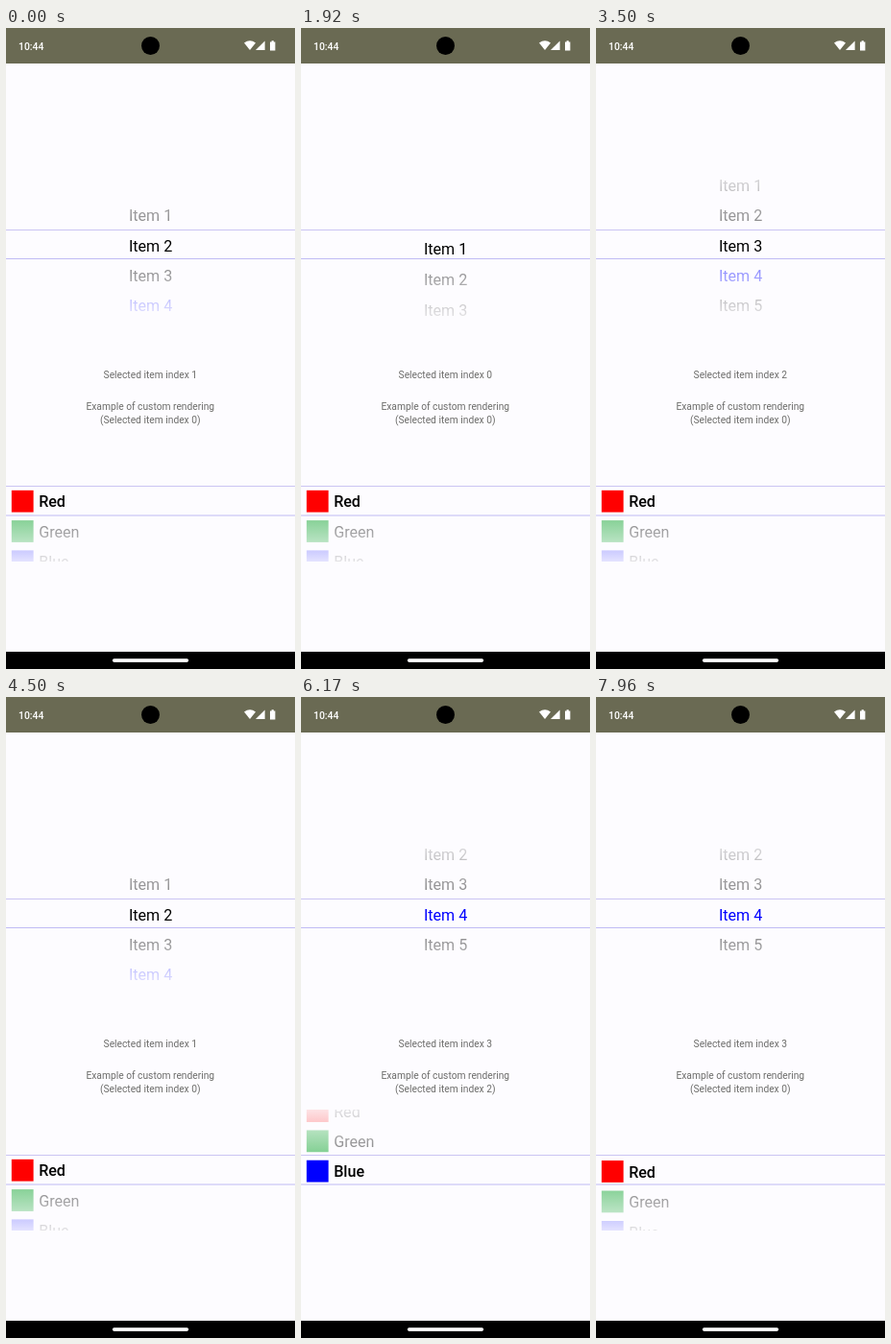
An HTML page for the animation above (8000 ms loop, 301x668 px).

```html
<!DOCTYPE html>
<html lang="en">
<head>
<meta charset="utf-8">
<title>Wheel pickers</title>
<style>
  html, body { margin: 0; width: 100%; height: 100%; overflow: hidden; background: #fdfcff; }
  svg { display: block; width: 301px; height: 668px; font-family: Roboto, sans-serif; }
  .item { font-size: 16.1px; }
  .note { font-size: 10.25px; fill: #6c6c6a; text-anchor: middle; }
  .clock { font-size: 10.4px; font-weight: 500; fill: #fff; }
</style>
</head>
<body>
<svg id="stage" viewBox="0 0 301 668">
  <defs>
    <clipPath id="clipItems"><rect y="150" width="301" height="152"/></clipPath>
    <clipPath id="clipColors"><rect y="430" width="301" height="126"/></clipPath>
    <linearGradient id="fadeUp" x1="0" y1="1" x2="0" y2="0">
      <stop offset="0" stop-color="#fdfcff" stop-opacity=".5"/>
      <stop offset="1" stop-color="#fdfcff" stop-opacity=".9"/>
    </linearGradient>
    <linearGradient id="fadeDown" x1="0" y1="0" x2="0" y2="1">
      <stop offset="0" stop-color="#fdfcff" stop-opacity=".5"/>
      <stop offset="1" stop-color="#fdfcff" stop-opacity=".9"/>
    </linearGradient>
  </defs>
  <rect width="301" height="668" fill="#fdfcff"/>

  <g id="items" class="item" text-anchor="middle" clip-path="url(#clipItems)"></g>
  <g id="colors" class="item" clip-path="url(#clipColors)"></g>
  <g id="bands"></g>

  <text class="note" x="150.3" y="365" id="itemNote"></text>
  <text class="note" x="150.3" y="397.6">Example of custom rendering</text>
  <text class="note" x="150.3" y="411.8" id="colorNote"></text>

  <rect width="301" height="37" fill="#6a6a53"/>
  <circle cx="150.5" cy="18.5" r="9.5"/>
  <text class="clock" x="13" y="22.6">10:44</text>
  <g fill="#fff">
    <path d="M248 15.6Q254 10.8 260 15.6L254 23Z"/>
    <path d="M269.6 13.4V23H260Z"/>
    <path d="M275 14.4h1.6v-1.2h2.2v1.2h1.6v9.2h-5.4Z"/>
  </g>
  <rect y="650" width="301" height="18"/>
  <rect x="110.8" y="657.2" width="79.4" height="3.7" rx="1.8" fill="#fff"/>
</svg>
<script>
const LOOP = 8000, PITCH = 31.3;
const $ = id => document.getElementById(id);

function add(parent, tag, attrs, text = '') {
  const el = document.createElementNS('http://www.w3.org/2000/svg', tag);
  for (const key in attrs) el.setAttribute(key, attrs[key]);
  el.textContent = text;
  parent.append(el);
  return el;
}

// Fades above and below the selected row, and its two rules.
function addBand(from, top, bottom, to) {
  const rect = (y, end, fill) =>
    add($('bands'), 'rect', { y, width: 301, height: end - y, fill });
  rect(from, top, 'url(#fadeUp)');
  rect(bottom, to, 'url(#fadeDown)');
  rect(top, top + 1, '#cbc5f3');
  rect(bottom - 1, bottom, '#c0bbf4');
}
addBand(150, 210, 241, 302);
addBand(430, 477, 508.5, 556);

const itemRows = [1, 2, 3, 4, 5].map(n => {
  const row = add($('items'), 'g', {});
  add(row, 'text', { x: 150.6, y: 5.7, fill: n === 4 ? '#00f' : '#000' }, 'Item ' + n);
  return row;
});
const colorRows = [['Red', '#f00'], ['Green', '#00a020'], ['Blue', '#00f']].map(([name, fill]) => {
  const row = add($('colors'), 'g', {});
  add(row, 'rect', { x: 5.8, y: -11.4, width: 22.8, height: 22.8, fill });
  add(row, 'text', { x: 34.2, y: 6.1 }, name);
  return row;
});

// [time in ms, row at the centre]
const itemPath = [[0, 1], [120, 1], [840, 0], [1200, 0], [1800, -.11], [1960, -.11], [2440, 0],
  [2710, 0], [3210, 2], [3520, 2], [4200, 1], [4580, 1], [5170, 3], [LOOP, 3]];
const colorPath = [[0, 0], [5670, 0], [6140, 1.97], [6200, 1.97], [6460, 2], [6630, 2],
  [7100, 2.015], [7420, 2.015], [7500, 2], [7780, 2], [7940, -.04], [LOOP, -.04]];

function sample(path, t) {
  const i = path.findIndex(([time]) => time > t);
  const [t0, a] = path[i - 1], [t1, b] = path[i];
  const u = (t - t0) / (t1 - t0);
  return a + (b - a) * u * u * (3 - 2 * u);
}

// Places the rows, stretching them a little past either end; returns the selected index.
function scroll(rows, center, pos) {
  const last = rows.length - 1;
  const over = Math.max(-pos, pos - last, 0);
  const pitch = PITCH * (1 + .14 * over);
  rows.forEach((row, i) =>
    row.setAttribute('transform', `translate(0 ${(center + (i - pos) * pitch).toFixed(2)})`));
  return Math.min(last, Math.max(0, Math.round(pos)));
}

function draw(t) {
  const item = scroll(itemRows, 226.8, sample(itemPath, t));
  const color = scroll(colorRows, 493.2, sample(colorPath, t));
  colorRows.forEach((row, i) =>
    row.lastChild.setAttribute('font-weight', i === color ? 500 : 400));
  $('itemNote').textContent = 'Selected item index ' + item;
  $('colorNote').textContent = `(Selected item index ${color})`;
}

const start = performance.now();
function tick() {
  draw((performance.now() - start) % LOOP);
  requestAnimationFrame(tick);
}
tick();
</script>
</body>
</html>
```
